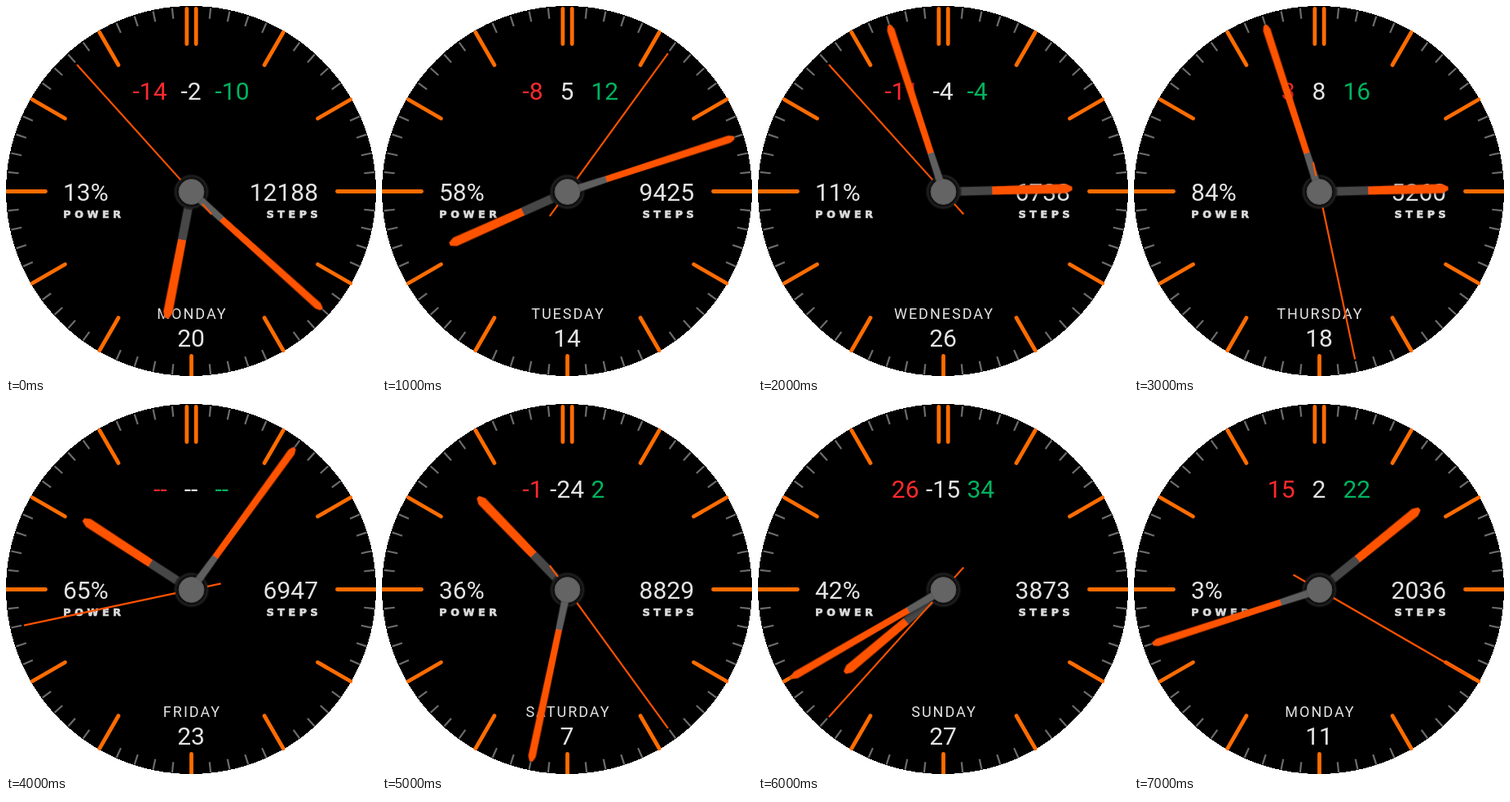
Animation, 454 px wide and 454 px high, one loop 8000 ms. Source, as an HTML page:

```html
<!DOCTYPE html>
<html lang="en">
<head>
<meta charset="utf-8">
<title>Watch face</title>
<style>
  html, body { margin: 0; width: 100%; height: 100%; overflow: hidden; background: #fff; }
  svg { display: block; width: 100vw; height: 100vh; }
  text { fill: #e4e4e4; }
  .num { font: 400 30px Roboto, sans-serif; }
  .day { font: 400 18px Roboto, sans-serif; letter-spacing: 2px; }
  .label { font: bold 12.6px "DejaVu Sans", sans-serif; letter-spacing: 4.6px; fill: #dadada; stroke: #dadada; stroke-width: .7; }
  .mid { text-anchor: middle; }
  .end { text-anchor: end; }
  .major { stroke: #ff6c00; stroke-width: 4.8; stroke-linecap: round; }
  .minor { stroke: #6c6c6c; stroke-width: 2.2; }
</style>
</head>
<body>
<svg viewBox="0 0 454 454">
  <defs>
    <filter id="shade" filterUnits="userSpaceOnUse" x="-40" y="-240" width="80" height="300">
      <feDropShadow dx="0" dy="0" stdDeviation="2.4" flood-color="#000" flood-opacity=".9"/>
    </filter>
    <radialGradient id="ring">
      <stop offset=".72" stop-color="#0c0c0c"/>
      <stop offset=".86" stop-color="#202020"/>
      <stop offset="1" stop-color="#000" stop-opacity="0"/>
    </radialGradient>
  </defs>
  <circle cx="227" cy="227" r="227" shape-rendering="crispEdges"/>
  <g id="ticks"></g>

  <text id="low" class="num end" x="197.5" y="115" style="fill:#ff2a2e"></text>
  <text id="now" class="num mid" x="227" y="115"></text>
  <text id="high" class="num" x="256.5" y="115" style="fill:#00b45f"></text>
  <text id="power" class="num" x="70" y="239"></text>
  <text id="steps" class="num end" x="383" y="239"></text>
  <text class="label" x="70.3" y="259.8">POWER</text>
  <text class="label" x="319.7" y="259.8">STEPS</text>
  <text id="day" class="day mid" x="228.5" y="384"></text>
  <text id="date" class="num mid" x="227" y="418"></text>

  <g transform="translate(227.5 228)">
    <g id="hour">
      <g filter="url(#shade)">
        <path d="M-5.2 0V-60H5.2V0z" fill="#474747"/>
        <path d="M-5 -60L-5.5 -151L-2 -158H2L5.5 -151L5 -60z" fill="#ff5200"/>
      </g>
    </g>
    <circle r="23" fill="url(#ring)"/>
    <g id="minute">
      <g filter="url(#shade)">
        <path d="M-4.6 0L-4 -50H4L4.6 0z" fill="#5f5f5f"/>
        <path d="M-3.8 -50L-4.5 -209L-2 -215H2L4.5 -209L3.8 -50z" fill="#ff5200"/>
      </g>
    </g>
    <path id="second" d="M0 37V20M0 -20V-210" stroke="#ff5200" stroke-width="2.2"/>
    <circle r="15.5" fill="#646464" stroke="#555" stroke-width="1"/>
  </g>
</svg>
<script>
  const STEP = 1000;
  const $ = id => document.getElementById(id);

  // h, m, s, then the text fields in order
  const fields = ["low", "now", "high", "power", "steps", "day", "date"];
  const states = [
    [6, 22, 53, "-14", "-2", "-10", "13%", "12188", "MONDAY", "20"],
    [8, 12, 6, "-8", "5", "12", "58%", "9425", "TUESDAY", "14"],
    [2, 57, 53, "-11", "-4", "-4", "11%", "6738", "WEDNESDAY", "26"],
    [2, 57, 28, "3", "8", "16", "84%", "5260", "THURSDAY", "18"],
    [10, 6, 43, "--", "--", "--", "65%", "6947", "FRIDAY", "23"],
    [10, 32, 24, "-1", "-24", "2", "36%", "8829", "SATURDAY", "7"],
    [7, 40, 37, "26", "-15", "34", "42%", "3873", "SUNDAY", "27"],
    [1, 42, 20, "15", "2", "22", "3%", "2036", "MONDAY", "11"]
  ];

  function tick(angle, inner, outer, kind, dx = 0) {
    const line = document.createElementNS("http://www.w3.org/2000/svg", "line");
    const attrs = {
      x1: dx, x2: dx, y1: -inner, y2: -outer, class: kind,
      transform: `translate(227.5 227.5) rotate(${angle})`
    };
    for (const key in attrs) line.setAttribute(key, attrs[key]);
    $("ticks").append(line);
  }

  for (let i = 0; i < 60; i++) {
    if (i % 5) tick(i * 6, 213, 226, "minor");
    else if (i === 0) [-5.7, 5.7].forEach(dx => tick(0, 181, 224, "major", dx));
    else if (i === 30) tick(180, 202, 226, "major");
    else tick(i * 6, 179, i % 15 ? 225.5 : 228, "major");
  }

  const turn = (id, angle) => $(id).setAttribute("transform", `rotate(${angle})`);

  let shown = -1;
  function draw(time) {
    const index = Math.floor(time / STEP) % states.length;
    if (index === shown) return;
    shown = index;
    const [h, m, s, ...values] = states[index];
    turn("hour", h * 30 + m / 2);
    turn("minute", m * 6);
    turn("second", s * 6);
    fields.forEach((id, i) => { $(id).textContent = values[i]; });
  }

  const start = performance.now();
  function loop() {
    draw(performance.now() - start);
    requestAnimationFrame(loop);
  }
  loop();
</script>
</body>
</html>
```
